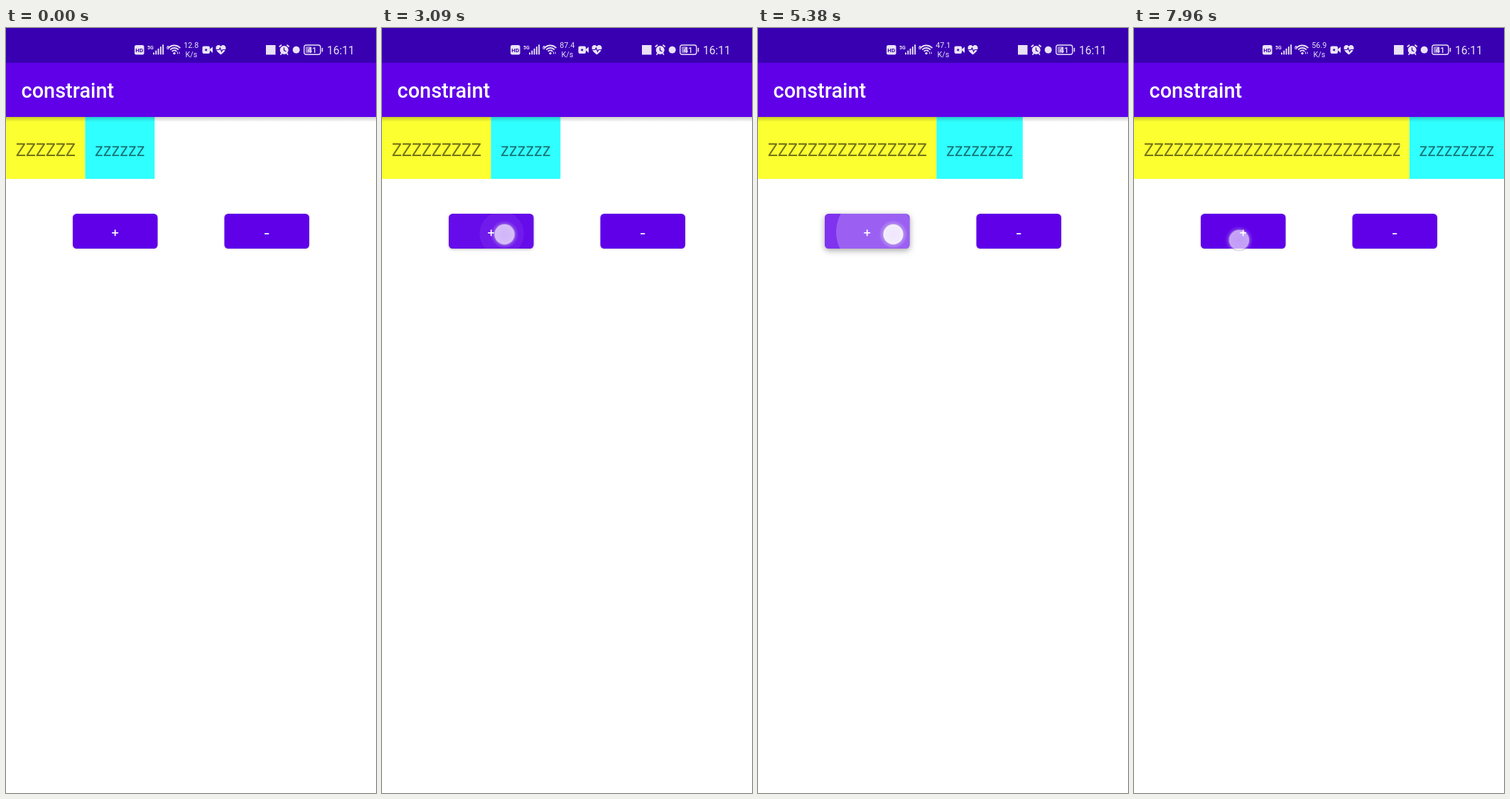
Animation of 521 by 1075 pixels, one loop 8000 ms. Source, as an HTML page with a canvas:

```html
<!DOCTYPE html>
<html lang="en">
<head>
<meta charset="utf-8">
<title>constraint</title>
<style>
  html, body { margin: 0; width: 521px; height: 1075px; overflow: hidden; background: #fff; }
  canvas { display: block; }
</style>
</head>
<body>
<canvas id="stage" width="521" height="1075"></canvas>
<script>
const c = document.getElementById('stage').getContext('2d');
const LOOP = 8000, RELEASE = 125, FADED = 215;
const BAR = '#3900b1', PURPLE = '#5f00e9', ICON = '#e9e2f6';
const PLUS = { x: 94, y: 261, w: 119.5, h: 49 }, MINUS = { ...PLUS, x: 307.5 };

// Press times; a few presses extend the second label instead of the first.
const taps = [2510, 2700, 2885, 3070, 3250, 3430, 3600, 3920, 4240, 4555, 4800, 5040, 5285,
  5525, 5770, 6010, 6200, 6390, 6580, 6770, 6970, 7155, 7340, 7540, 7745, 7960];
const second = [7, 10, 13];

// Finger position: time, x, y
const finger = [[2510, 170, 288], [3600, 175, 292], [4555, 191, 286], [6010, 190, 294],
  [6580, 168, 306], [6770, 150, 308], [6970, 142, 272], [7960, 148, 298]];
const speeds = [[7430, '56.9'], [4400, '47.1'], [1370, '87.4'], [0, '12.8']];

const clamp = v => Math.max(0, Math.min(1, v));
const mix = (a, b, k) => a + (b - a) * k;
const white = a => `rgba(255,255,255,${a})`;

function fingerAt(t) {
  let i = 1;
  while (i < finger.length - 1 && finger[i][0] < t) i++;
  const a = finger[i - 1], b = finger[i], k = clamp((t - a[0]) / (b[0] - a[0]));
  return [mix(a[1], b[1], k), mix(a[2], b[2], k)];
}

function rect(x, y, w, h, fill) {
  c.fillStyle = fill;
  c.fillRect(x, y, w, h);
}

function round(x, y, w, h, r, fill) {
  c.beginPath();
  c.roundRect(x, y, w, h, r);
  c.fillStyle = fill;
  c.fill();
}

function disc(x, y, r, fill) {
  c.beginPath();
  c.arc(x, y, r, 0, 7);
  c.fillStyle = fill;
  c.fill();
}

function line(width, color, ...p) {
  c.beginPath();
  for (let i = 0; i < p.length; i += 2) c.lineTo(p[i], p[i + 1]);
  c.lineWidth = width;
  c.strokeStyle = color;
  c.stroke();
}

function text(s, x, y, font, fill, align = 'left', spacing = 0) {
  c.font = font + ', sans-serif';
  c.letterSpacing = spacing + 'px';
  c.textAlign = align;
  c.fillStyle = fill;
  c.fillText(s, x, y);
}

function statusBar(t) {
  rect(0, 0, 521, 49, BAR);
  round(181, 24, 13.5, 13.5, 2.5, ICON);
  text('HD', 187.8, 33.8, '700 8px Roboto', BAR, 'center');
  text('5G', 199, 30, '700 7px Roboto', ICON);
  for (let i = 0; i < 5; i++) rect(207 + i * 3.3, 34.5 - i * 2.8, 1.9, 2.8 + i * 2.8, ICON);

  text('6', 226, 29.5, '700 7px Roboto', ICON);
  c.strokeStyle = ICON;
  c.lineWidth = 1.8;
  for (const r of [4.5, 8, 11.5]) {
    c.beginPath();
    c.arc(237, 36, r, -Math.PI * 0.76, -Math.PI * 0.24);
    c.stroke();
  }
  disc(237, 35.6, 1.7, ICON);
  line(1, ICON, 241.5, 36.5, 241.5, 33.5);
  line(1, ICON, 244, 33.5, 244, 36.5);

  const speed = speeds.find(s => t >= s[0])[1];
  text(speed, 260.8, 28.2, '10.8px Roboto', ICON, 'center');
  text('K/s', 260.8, 40.5, '10.8px Roboto', ICON, 'center');

  round(276.5, 25.5, 10.5, 10.5, 2, ICON);
  c.fill(new Path2D('M286 30.5L291 26.5V35Z'));
  disc(281.7, 30.7, 1.5, BAR);

  c.fillStyle = ICON;
  c.fill(new Path2D('M302.5 37.5C298 34 295.5 31.5 295.5 28C295.5 24 300.5 22.5 302.5 26' +
    'C304.500 22.5 309.500 24 309.500 28C309.500 31.500 307 34 302.500 37.500Z'));
  line(1.2, BAR, 296, 30.5, 300, 30.5, 301.5, 28, 303.5, 33, 305, 30.5, 309, 30.5);

  rect(366, 24, 13.5, 13.5, ICON);
  disc(391.7, 31, 6, ICON);
  line(1.8, ICON, 384.7, 26.5, 388, 23.8);
  line(1.8, ICON, 395.4, 23.8, 398.7, 26.5);
  line(1.6, ICON, 388.5, 35, 386.5, 37.8);
  line(1.6, ICON, 395, 35, 397, 37.8);
  line(1.3, BAR, 391.5, 27.5, 391.5, 31.5, 394.5, 33);
  disc(408.7, 30.7, 5, ICON);

  c.beginPath();
  c.roundRect(419.8, 24, 23, 13.3, 3);
  c.lineWidth = 1.4;
  c.strokeStyle = ICON;
  c.stroke();
  round(421.8, 26, 8.5, 9.3, 1.5, white(0.45));
  rect(444.6, 28, 1.6, 5.5, ICON);
  text('41', 431, 35, '500 11.5px Roboto', ICON, 'center');
  text('16:11', 452, 36.8, '15.6px Roboto', ICON);
}

function label(s, x, w, fill, spacing) {
  rect(x, 125, w, 87, fill);
  c.save();
  c.beginPath();
  c.rect(x + 13.5, 125, w - 27, 87);
  c.clip();
  text(s, x + 13.7, 179.6, '25px "Noto Sans"', 'rgba(0,0,0,.54)', 'left', spacing);
  c.restore();
}

function labels(t) {
  let big = 6, small = 6;
  taps.forEach((p, i) => {
    if (t >= p + RELEASE) second.includes(i) ? small++ : big++;
  });
  const w2 = 27.4 + 11.75 * small;
  const w1 = Math.min(27.4 + 14 * big, 521 - w2);
  label('Z'.repeat(big), 0, w1, '#fcff30', -0.3);
  label('z'.repeat(small), w1, w2, '#30ffff', 0);
}

function button({ x, y, w, h }, lift) {
  c.save();
  c.shadowColor = `rgba(0,0,0,${mix(0.2, 0.36, lift)})`;
  c.shadowBlur = mix(2, 9, lift);
  c.shadowOffsetY = mix(0.6, 2.5, lift);
  round(x, y, w, h, 5.5, PURPLE);
  c.restore();
}

function ripple(age, [fx, fy], strength) {
  const { x, y, w, h } = PLUS;
  const k = 1 - (1 - clamp(age / 225)) ** 2.4;
  c.save();
  c.beginPath();
  c.roundRect(x, y, w, h, 5.5);
  c.clip();
  rect(x, y, w, h, white(0.2 * strength * clamp((age - 20) / 45)));
  disc(mix(fx, x + w / 2, k), mix(fy, y + h / 2, k), 64.4 * mix(0.35, 1, k), white(0.22 * strength));
  c.restore();
}

function touch(x, y, age) {
  const a = Math.min(0.85, 0.55 + age / 250);
  const glow = c.createRadialGradient(x, y, 13, x, y, 20);
  glow.addColorStop(0, white(0.4 * a));
  glow.addColorStop(1, white(0));
  disc(x, y, 20, glow);
  const core = c.createRadialGradient(x, y, 0, x, y, 14.2);
  core.addColorStop(0, white(a * 0.9));
  core.addColorStop(0.75, white(a * 0.95));
  core.addColorStop(1, white(a));
  disc(x, y, 14.2, core);
  c.beginPath();
  c.arc(x, y, 14.8, 0, 7);
  c.lineWidth = 1.6;
  c.strokeStyle = 'rgba(160,150,200,.35)';
  c.stroke();
}

function draw(t) {
  rect(0, 0, 521, 1075, '#fff');
  labels(t);

  rect(0, 49, 521, 76, PURPLE);
  const shade = c.createLinearGradient(0, 125, 0, 132);
  shade.addColorStop(0, 'rgba(0,0,0,.2)');
  shade.addColorStop(1, 'rgba(0,0,0,0)');
  rect(0, 125, 521, 7, shade);
  statusBar(t);
  text('constraint', 21.5, 98, '500 28.9px Roboto', '#fff');

  const live = taps.filter(p => t >= p && t - p < FADED).map(p => {
    const age = t - p;
    return { p, age, strength: clamp(age / 75) * clamp((FADED - age) / (FADED - RELEASE)) };
  });
  button(PLUS, Math.max(0, ...live.map(l => l.strength)));
  button(MINUS, 0);
  for (const l of live) ripple(l.age, fingerAt(l.p), l.strength);
  text('+', 153.7, 293.3, '500 18.5px Inter', '#fff', 'center');
  text('-', 367.2, 295, '500 19px Inter', '#fff', 'center');

  const down = taps.find(p => t >= p - 10 && t < p + RELEASE);
  if (down) touch(...fingerAt(down), t - down);
}

const start = performance.now();
function tick() {
  draw((performance.now() - start) % LOOP);
  requestAnimationFrame(tick);
}
tick();
</script>
</body>
</html>
```
